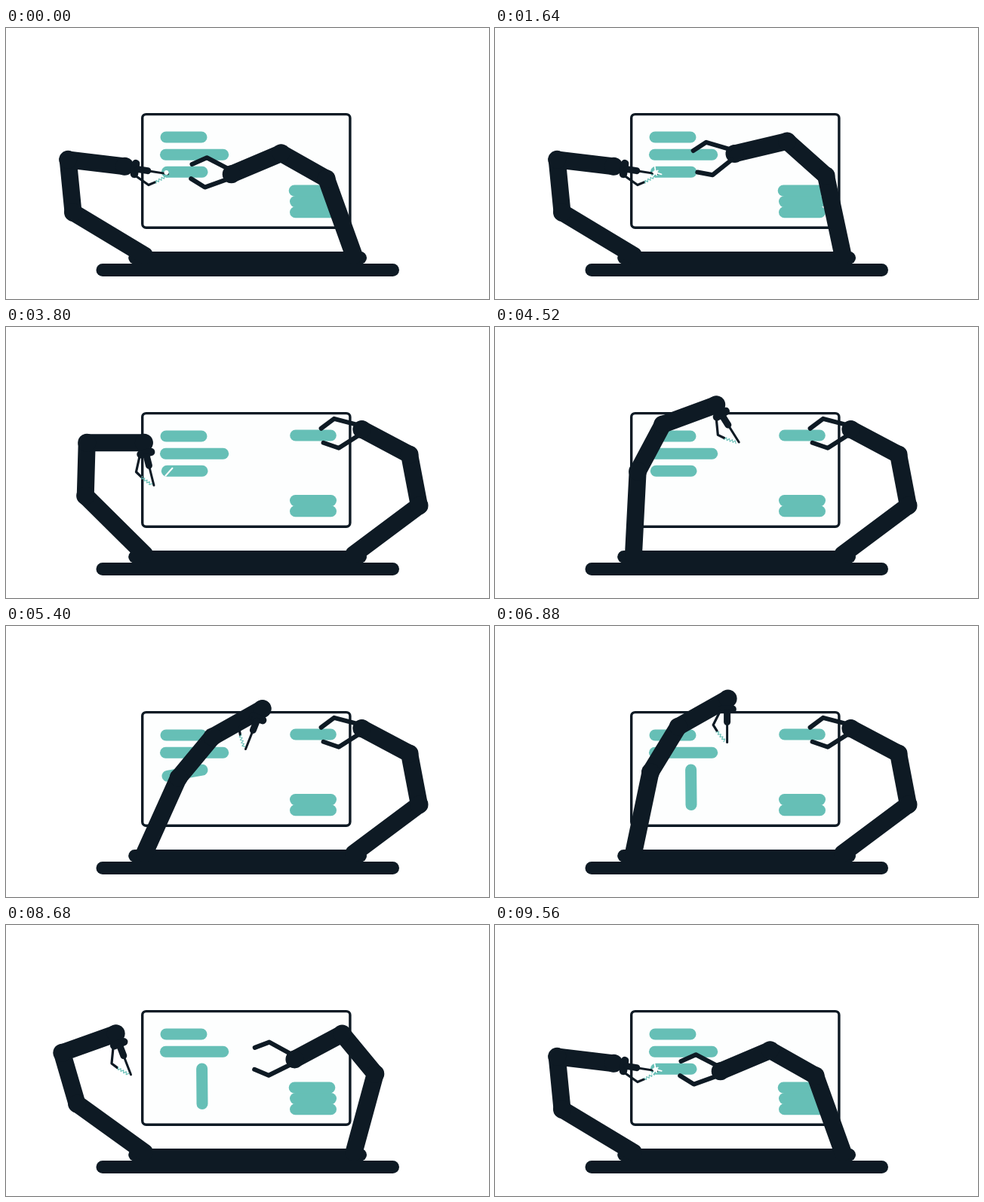
Write an HTML page with a canvas that moves like this. It is 640 px wide and 360 px high and loops after 9600 ms.

```html
<!DOCTYPE html>
<html lang="en">
<head>
<meta charset="utf-8">
<title>Robot arms</title>
<style>
html, body { margin: 0; width: 100%; height: 100%; overflow: hidden; background: #fff; }
canvas { display: block; width: 640px; height: 360px; }
</style>
</head>
<body>
<canvas id="stage"></canvas>
<script>
const LOOP = 9600, STEP = 40;
const NAVY = '#0e1a24', TEAL = '#66bfb6', WHITE = '#fff';

// Poses: angles of upper arm, forearm, hand and tool, in degrees.
const hold = [-109.7, -150.5, -203, -176];
const raised = [-57, -97.5, -163.6, -238];
const stack = [-36.8, -106.6, -214, -182];
const lifted = [-36.8, -100.8, -152, -189];
const swungOut = [-25, -96, -185, -215];

const weld = [-148.9, -95.6, 6.8, 9];
const hang = [-135.2, -88.4, 0, 76];
const reach = [-65.8, -50.3, -29, 48];
const pull = [-65.8, -50.3, -29.6, 130];
const drop = [-78.2, -58.6, -29.6, 90];
const rest = [-142.5, -110, -28.9, 90];

const rightMoves = [
  [0, hold], [1240, hold], [2480, raised], [2800, swungOut], [3040, stack], [3160, stack],
  [3760, lifted], [6960, lifted], [7760, stack], [7960, stack], [9360, hold], [LOOP, hold]
];
const leftMoves = [
  [0, weld], [3040, weld], [3800, hang], [5000, reach], [5040, reach], [5560, pull],
  [5960, pull], [6880, drop], [6960, drop], [7960, rest], [8320, rest], [9400, weld], [LOOP, weld]
];

const canvas = document.getElementById('stage');
const scale = window.devicePixelRatio || 1;
canvas.width = 640 * scale;
canvas.height = 360 * scale;
const ctx = canvas.getContext('2d');
ctx.lineCap = ctx.lineJoin = 'round';

const rad = deg => deg * Math.PI / 180;

const random = seed => {
  const v = Math.sin(seed * 127.1 + 11.7) * 43758.5453;
  return v - Math.floor(v);
};

function ease(t, from, to) {
  const u = Math.min(1, Math.max(0, (t - from) / (to - from)));
  return u * u * (3 - 2 * u);
}

// Monotone cubic: passes smoothly through poses and rests on repeated ones.
function poseAt(moves, t) {
  let i = 0;
  while (i < moves.length - 2 && t >= moves[i + 1][0]) i++;
  const [t0, a] = moves[i], [t1, b] = moves[i + 1];
  const span = t1 - t0, u = (t - t0) / span;
  const slope = (k, c) => moves[k] && moves[k + 1]
    ? (moves[k + 1][1][c] - moves[k][1][c]) / (moves[k + 1][0] - moves[k][0]) : 0;
  const tangent = (k, c) => {
    const p = slope(k - 1, c), q = slope(k, c);
    return p * q > 0 ? span * 2 * p * q / (p + q) : 0;
  };
  return a.map((from, c) => from + (b[c] - from) * ease(u, 0, 1)
    + u * (1 - u) * ((1 - u) * tangent(i, c) - u * tangent(i + 1, c)));
}

function line(points, width, color = NAVY) {
  ctx.beginPath();
  points.forEach(([x, y]) => ctx.lineTo(x, y));
  ctx.lineWidth = width;
  ctx.strokeStyle = color;
  ctx.stroke();
}

function dot(x, y, r, color = NAVY) {
  ctx.beginPath();
  ctx.arc(x, y, r, 0, Math.PI * 2);
  ctx.fillStyle = color;
  ctx.fill();
}

const bar = (x1, x2, y) => line([[x1, y], [x2, y]], 15, TEAL);

function at([x, y], angle, draw) {
  ctx.save();
  ctx.translate(x, y);
  ctx.rotate(rad(angle));
  draw();
  ctx.restore();
}

function arm(base, lengths, pose) {
  const joints = [base];
  lengths.forEach((length, i) => {
    const [x, y] = joints[i], a = rad(pose[i]);
    joints.push([x + length * Math.cos(a), y + length * Math.sin(a)]);
  });
  line(joints, 23);
  joints.slice(1).forEach(([x, y]) => dot(x, y, 12));
  return joints[3];
}

function gripper(open) {
  const knuckle = 19.7 + 2.4 * open, tip = 9.6 + 4.9 * open;
  for (const side of [-1, 1]) {
    line([[5, 7 * side], [34, knuckle * side], [53, tip * side]], 6);
  }
}

function torch(t) {
  line([[14, -6], [14, 8]], 10.5);
  line([[18, 1], [31, 1]], 9);
  line([[31, 1], [58, 1]], 3);
  line([[16, 10], [35, 19.5], [43, 14.5]], 3.2);

  const flip = Math.floor(t / 200) % 2 ? 1 : -1;
  const zigzag = Array.from({ length: 9 }, (_, i) => {
    const side = i % 2 ? flip : -flip;
    return [43.5 + i * 1.6 + side, 14.5 - i * 1.3 + side * 1.4];
  });
  line(zigzag, 1.1, TEAL);
}

function sparks(t) {
  const frame = Math.round(t / STEP), phase = frame % 6;
  const length = 28 * Math.sin(Math.PI * Math.sqrt(phase / 6));
  dot(212.5, 192, 3, WHITE);
  if (!phase) return;
  for (let i = 0; i < 6; i++) {
    const a = rad(-99 + i * 56.5 + 8 * (random(frame + i * 31) - 0.5));
    const far = length * (i % 2 ? 0.5 : 1.05);
    const point = r => [213 + r * Math.cos(a), 192 + r * Math.sin(a)];
    line([point(far / 4), point(far)], 1.8, WHITE);
  }
}

function screen() {
  ctx.beginPath();
  ctx.roundRect(180.7, 114.6, 275.2, 150.6, 5);
  ctx.fillStyle = '#fdfefe';
  ctx.fill();
  ctx.lineWidth = 3.4;
  ctx.strokeStyle = NAVY;
  ctx.stroke();
}

function bars(t) {
  bar(212, 259, 145);
  bar(211.5, 287.7, 168.2);

  const tilt = -10 * ease(t, 5160, 5400) - 80.5 * ease(t, 5960, 6500) + 90.5 * ease(t, 8960, 9400);
  at([259.6, 191.3], tilt, () => bar(-46.3, 0.4, 0));
  if (t >= 3040 && t < 4040) line([[211.5, 197.5], [220.5, 187.5]], 2, WHITE);

  const lift = ease(t, 3160, 3760) - ease(t, 6960, 7760);
  const x = 405.5 + 1.5 * lift - 7 * Math.sin(Math.PI * lift);
  bar(383.5, 430.5, 244.8);
  bar(383.5, 430.5, 230.6);
  bar(x - 23.3, x + 23.3, 216 - 72 * lift);
}

function render(t) {
  ctx.setTransform(scale, 0, 0, scale, 0, 0);
  ctx.fillStyle = WHITE;
  ctx.fillRect(0, 0, 640, 360);

  screen();
  bars(t);
  line([[128, 321.5], [512.5, 321.5]], 17);
  line([[170.5, 305.3], [469.7, 305.3]], 16.6);

  const left = poseAt(leftMoves, t);
  at(arm([183.5, 302], [110.3, 70.5, 75.7], left), left[3], () => torch(t));
  if (t < 3040 || t >= 9480) sparks(t);

  const right = poseAt(rightMoves, t);
  const open = ease(t, 1040, 1240) - ease(t, 3040, 3160) + ease(t, 7760, 7920) - ease(t, 9360, 9480);
  at(arm([461, 302], [108, 69, 71.5], right), right[3], () => gripper(open));
}

const start = performance.now();
function tick() {
  const t = (performance.now() - start) % LOOP;
  render(Math.floor(t / STEP) * STEP);
  requestAnimationFrame(tick);
}
tick();
</script>
</body>
</html>
```
